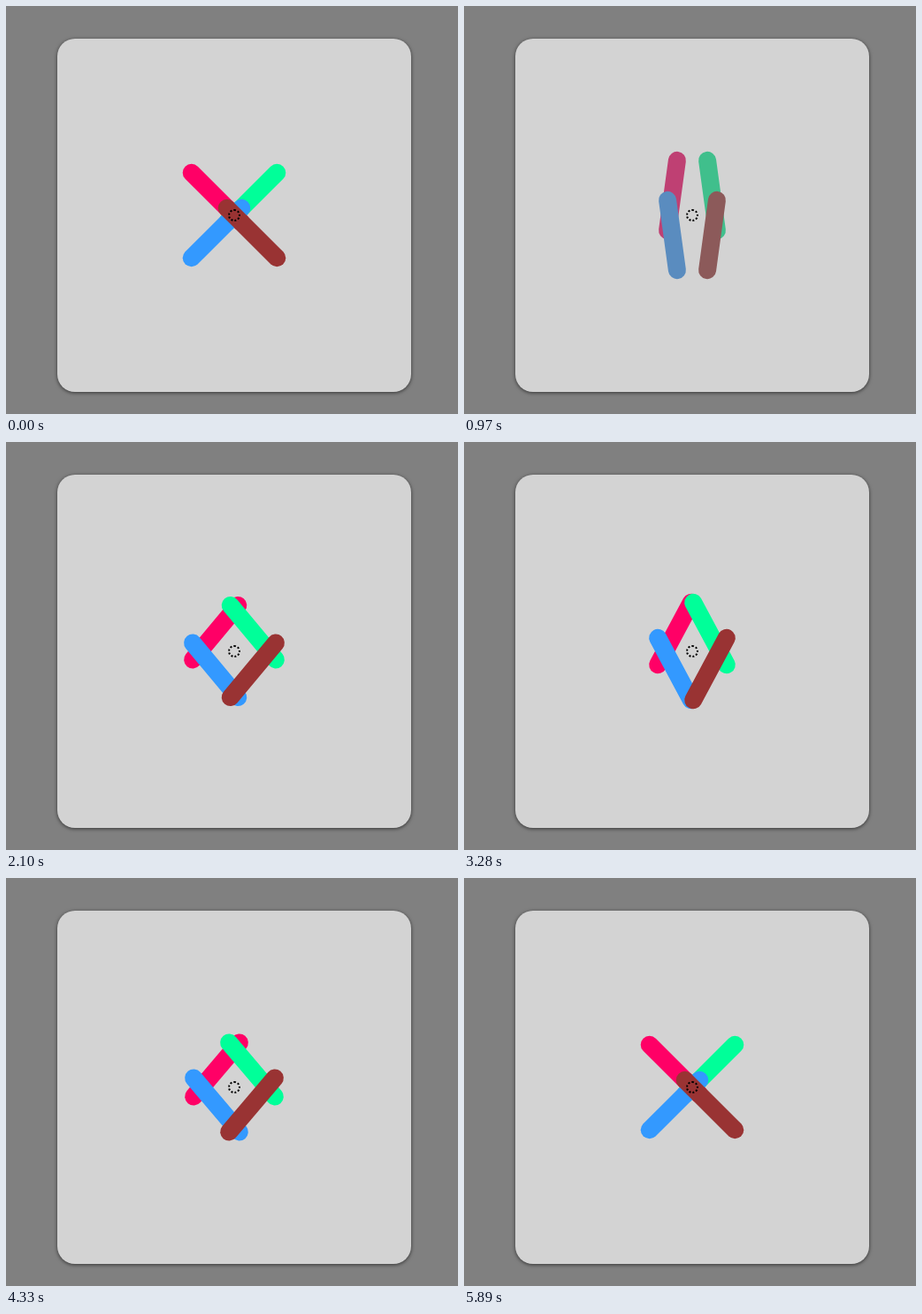
Animation, 511 px wide and 462 px high, one loop 6.31 s. Source, as an HTML page without scripts:

```html
<!DOCTYPE html>
<html lang="en">
<head>
<meta charset="utf-8">
<title>Spinning bars</title>
<style>
  @property --turn { syntax: "<angle>"; inherits: true; initial-value: 45deg; }
  @property --spread { syntax: "<length>"; inherits: true; initial-value: 20px; }
  @property --tone { syntax: "<number>"; inherits: true; initial-value: 1; }

  html, body {
    margin: 0;
    width: 100%;
    height: 100%;
    overflow: hidden;
    background: #808080;
  }

  .card {
    position: absolute;
    left: 58px;
    top: 37px;
    width: 400px;
    height: 400px;
    border-radius: 20px;
    overflow: hidden;
    background: #d3d3d3;
    box-shadow: 0 1px 4px rgba(0, 0, 0, .6);
    animation: turn 6310ms infinite, spread 6310ms infinite, tone 6310ms linear infinite;
  }

  .bar {
    position: absolute;
    left: 150px;
    top: 190px;
    width: 100px;
    height: 20px;
    border-radius: 10px;
    background: var(--color);
    filter: contrast(var(--tone));
    transform:
      translate(calc(var(--x) * var(--spread)), calc(var(--y) * var(--spread)))
      rotate(calc(var(--x) * var(--y) * var(--turn)));
  }

  .pink  { --x: -1; --y: -1; --color: #f06; }
  .green { --x: 1;  --y: -1; --color: #0f9; }
  .blue  { --x: -1; --y: 1;  --color: #39f; }
  .brown { --x: 1;  --y: 1;  --color: #933; }

  .hub {
    position: absolute;
    left: 193px;
    top: 193px;
    width: 10px;
    height: 10px;
    border: 2px dotted #000;
    border-radius: 50%;
  }

  /* Unwind to a diamond, then wind back up to the cross */
  @keyframes turn {
    0% { --turn: 765deg; }
    4.12% { --turn: 765deg; animation-timing-function: cubic-bezier(.5, -.3, .1, 1.15); }
    35.325% { --turn: 135deg; }
    44.374% { --turn: 135deg; animation-timing-function: cubic-bezier(.55, -.42, .82, .2); }
    59.271% { --turn: 351deg; animation-timing-function: cubic-bezier(.25, .47, .5, .76); }
    68.621% { --turn: 670deg; animation-timing-function: cubic-bezier(.26, .85, .45, 1.45); }
    87.956%, 100% { --turn: 765deg; }
  }

  /* Fly in from outside the card and settle */
  @keyframes spread {
    0%, 4.12% { --spread: 20px; animation-timing-function: step-end; }
    4.121% { --spread: 300px; animation-timing-function: cubic-bezier(.6, 0, .8, .7); }
    14.42% { --spread: 68px; animation-timing-function: linear; }
    15.373% { --spread: 22.7px; animation-timing-function: ease-out; }
    17.75% { --spread: 5px; animation-timing-function: ease-in-out; }
    24.56% { --spread: 30px; animation-timing-function: ease-out; }
    27.7% { --spread: 34px; animation-timing-function: ease-in-out; }
    33.28% { --spread: 21.3px; animation-timing-function: ease-out; }
    37.2%, 100% { --spread: 20px; }
  }

  @keyframes tone {
    0%, 4.12% { --tone: 1; animation-timing-function: step-end; }
    4.121% { --tone: 0; animation-timing-function: ease-in; }
    15.373% { --tone: .495; animation-timing-function: ease-out; }
    26%, 100% { --tone: 1; }
  }
</style>
</head>
<body>
  <div class="card">
    <div class="bar pink"></div>
    <div class="bar green"></div>
    <div class="bar blue"></div>
    <div class="bar brown"></div>
    <div class="hub"></div>
  </div>
</body>
</html>
```
